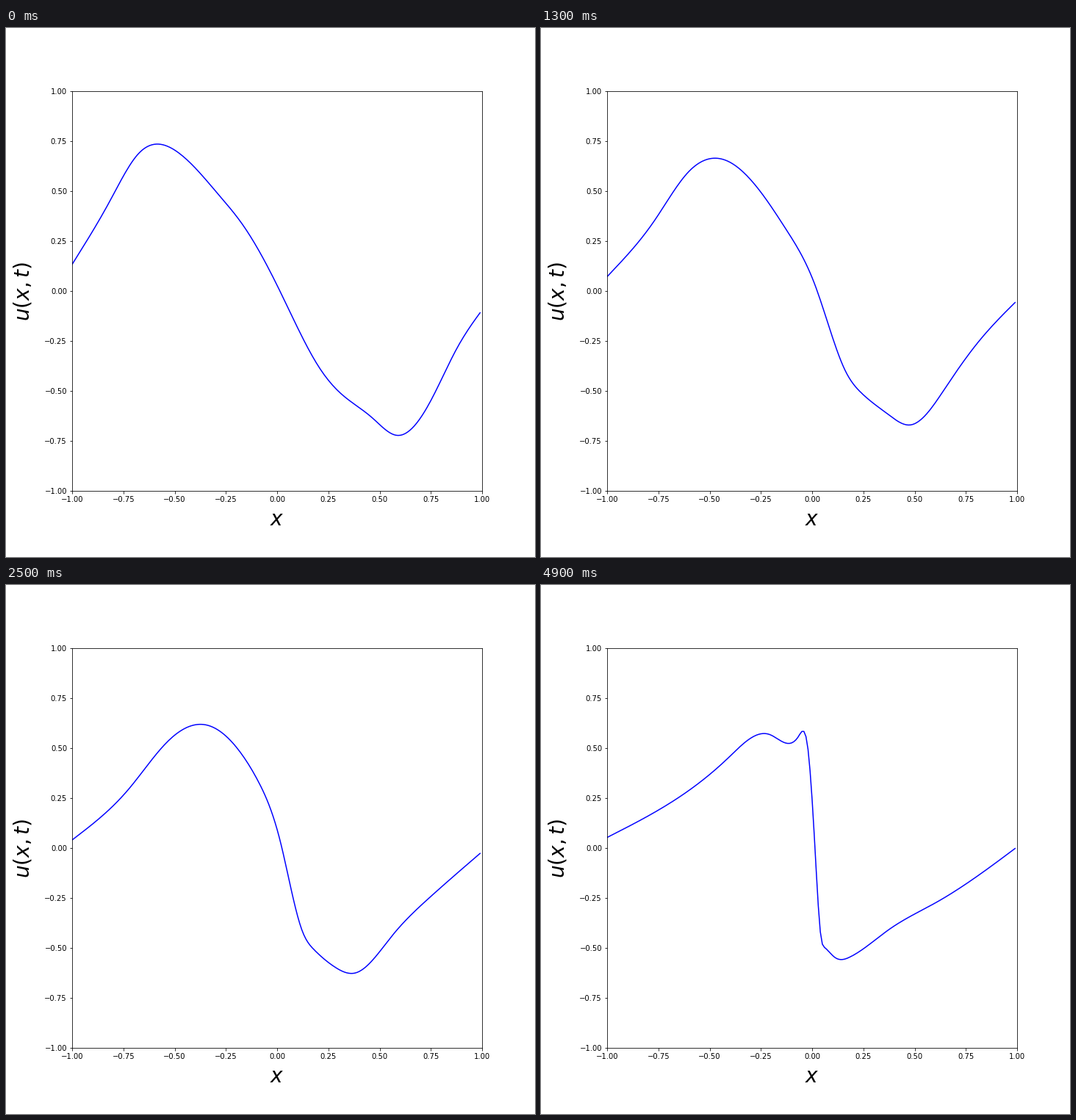
A matplotlib script for the animation above (5 s loop, 720 by 720 pixels).

```python
import numpy as np
import matplotlib.pyplot as plt
from matplotlib.animation import FuncAnimation

SIZE, DPI = 720, 72
FRAMES, INTERVAL = 50, 100
X = np.arange(-100, 100) / 100

# Key points of the wave, as distances from the point where the front forms.
FRONT = .014
OFFSETS = np.array([-1, -.83, -.69, -.51, -.3, -.18, 0,
                    .19, .29, .45, .57, .74, .86, 1])

# Heights of the key points at the beginning, halfway and at the end.
OPENING = np.array([.157, .451, .689, .704, .484, .330, 0,
                    -.380, -.506, -.634, -.722, -.540, -.292, -.075])
HALFWAY = np.array([.053, .300, .530, .619, .471, .333, .040,
                    -.410, -.508, -.598, -.627, -.440, -.254, -.006])
CLOSING = np.array([.061, .267, .451, .569, .561, .505, 0,
                    -.435, -.497, -.548, -.545, -.407, -.272, .017])


def key_positions(s):
    """Points near the front are drawn into it; the outermost stay put."""
    power = np.where(OFFSETS < 0, 1.6, 3)
    pull = .86 * (1 - np.abs(OFFSETS)**power)
    return FRONT + OFFSETS * (1 - s * pull)


def key_heights(s):
    """Parabola in time through the three poses."""
    return ((1 - s) * (1 - 2 * s) * OPENING
            + 4 * s * (1 - s) * HALFWAY
            + s * (2 * s - 1) * CLOSING)


def natural_spline(knots, values, x):
    n = len(knots)
    h = np.diff(knots)
    slope = np.diff(values) / h
    system, rhs = np.eye(n), np.zeros(n)
    for i in range(1, n - 1):
        system[i, i - 1:i + 2] = h[i - 1], 2 * (h[i - 1] + h[i]), h[i]
        rhs[i] = 6 * (slope[i] - slope[i - 1])
    bend = np.linalg.solve(system, rhs)

    i = np.clip(np.searchsorted(knots, x) - 1, 0, n - 2)
    width, a, b = h[i], knots[i + 1] - x, x - knots[i]
    return (a * values[i] / width + b * values[i + 1] / width
            + (a**3 / width - a * width) * bend[i] / 6
            + (b**3 / width - b * width) * bend[i + 1] / 6)


def wave(frame):
    s = frame / (FRAMES - 1)
    return natural_spline(key_positions(s), key_heights(s), X)


fig = plt.figure(figsize=(SIZE / DPI, SIZE / DPI), dpi=DPI, facecolor="white")
ax = fig.add_axes([.125, .125, .775, .755])
ticks = np.linspace(-1, 1, 9)
ax.set(xlim=(-1, 1), ylim=(-1, 1), xticks=ticks, yticks=ticks)

label = dict(fontsize=28, ha="center", va="baseline", rotation_mode="anchor")
fig.text(369 / SIZE, 1 - 677 / SIZE, "$x$", **label)
fig.text(31.5 / SIZE, 1 - 358.2 / SIZE, "$u(x,t)$", rotation=90, **label)

line, = ax.plot(X, wave(0), color="blue", lw=1.5)


def update(frame):
    line.set_ydata(wave(frame))
    return line,


anim = FuncAnimation(fig, update, frames=FRAMES, interval=INTERVAL,
                     repeat=True, repeat_delay=0)
plt.show()
```
